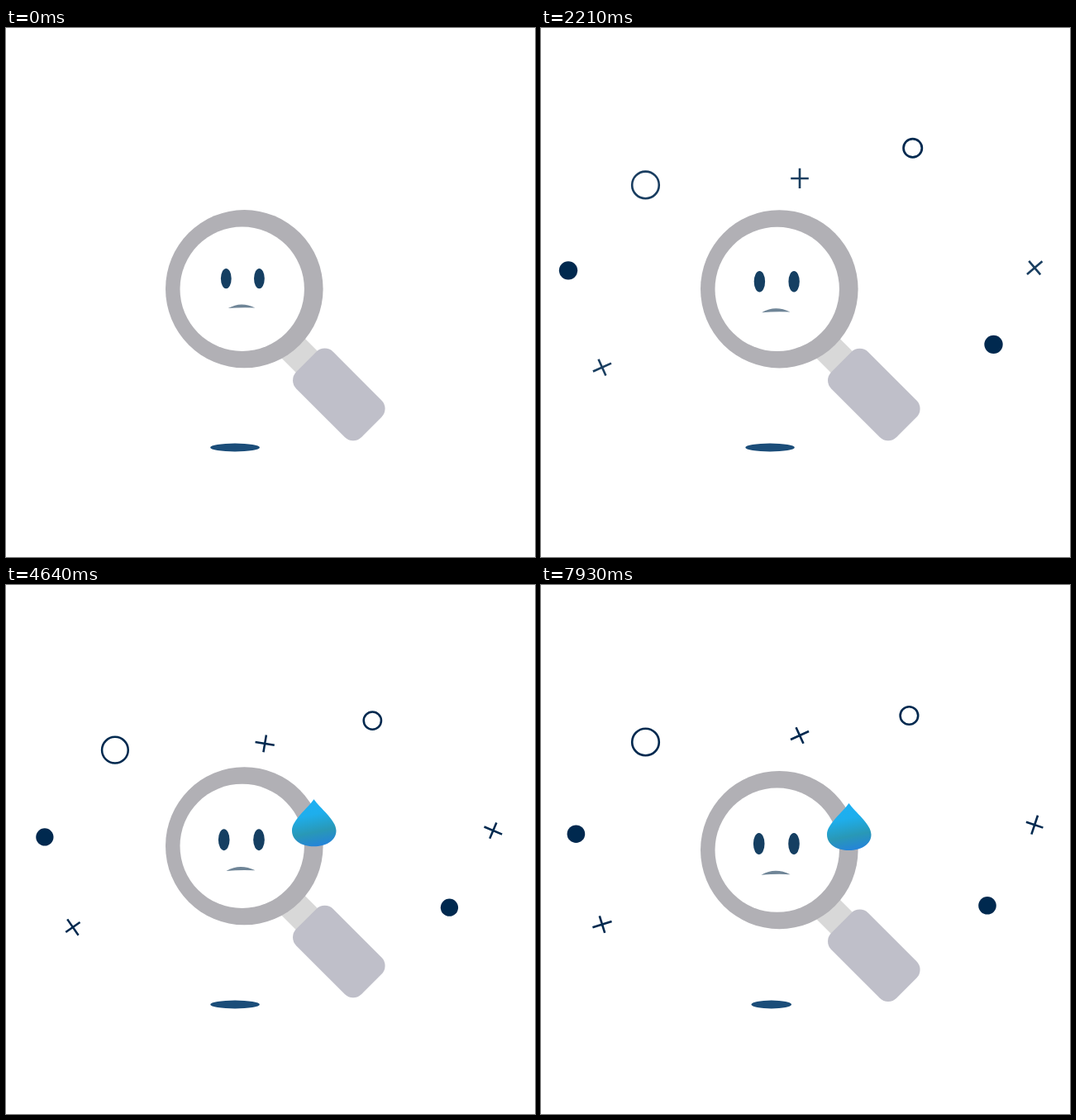
An HTML page with a canvas that plays this animation: 640x640 px, repeating every 8000 ms.

```html
<!DOCTYPE html>
<html>
<head>
<meta charset="utf-8">
<style>
  html, body { margin: 0; width: 100%; height: 100%; overflow: hidden; background: #fff; }
  canvas { display: block; width: 640px; height: 640px; }
</style>
</head>
<body>
<canvas id="stage" width="640" height="640"></canvas>
<script>
const ctx = document.getElementById('stage').getContext('2d');
const LOOP = 8000;
const NAVY = '#00294f';
const ORIGIN = { x: 318.5, y: 533 };

// Piecewise linear value from [time, value] keys.
function track(t, keys) {
  if (t <= keys[0][0]) return keys[0][1];
  for (let i = 1; i < keys.length; i++) {
    const [t0, v0] = keys[i - 1], [t1, v1] = keys[i];
    if (t < t1) return v0 + (v1 - v0) * (t - t0) / (t1 - t0);
  }
  return keys[keys.length - 1][1];
}

const early = {
  scale: [[0, 0], [280, 0], [1570, 1.11], [2865, 0.888], [5240, 1]],
  alpha: [[280, 0], [1500, 1], [1600, 1], [2865, 0.8], [3800, 1]]
};
const late = {
  scale: [[0, 0], [1570, 1.028], [1730, 1.106], [2865, 0.936], [5240, 1]],
  alpha: [[0, 0], [1720, 1]]
};

// Each cross turns at a steady rate (degrees per second) from its start time.
const symbols = [
  { x: 126.5, y: 190, ring: 16.3, group: early },
  { x: 313, y: 182, spin: 44.4, from: 2400, group: early },
  { x: 597.2, y: 290.2, spin: 26, from: 300, group: early },
  { x: 74, y: 410.6, spin: 32.7, from: 200, group: early },
  { x: 445.4, y: 158, ring: 10.8, group: late },
  { x: 42.4, y: 301.2, dot: 10.8, group: late },
  { x: 540, y: 387.8, dot: 10.8, group: late }
];

function ellipse(x, y, rx, ry, color) {
  ctx.fillStyle = color;
  ctx.beginPath();
  ctx.ellipse(x, y, rx, ry, 0, 0, 2 * Math.PI);
  ctx.fill();
}

function drawSymbol(symbol, t) {
  const scale = track(t, symbol.group.scale);
  if (scale <= 0) return;
  ctx.save();
  ctx.globalAlpha = track(t, symbol.group.alpha);
  ctx.translate(ORIGIN.x, ORIGIN.y);
  ctx.scale(scale, scale);
  ctx.translate(symbol.x - ORIGIN.x, symbol.y - ORIGIN.y);
  ctx.strokeStyle = NAVY;
  ctx.lineWidth = 2.6;
  if (symbol.dot) {
    ellipse(0, 0, symbol.dot, symbol.dot, NAVY);
  } else {
    ctx.beginPath();
    if (symbol.ring) {
      ctx.arc(0, 0, symbol.ring, 0, 2 * Math.PI);
    } else {
      ctx.rotate(symbol.spin * Math.max(0, t - symbol.from) / 1000 * Math.PI / 180);
      ctx.moveTo(-10.8, 0);
      ctx.lineTo(10.8, 0);
      ctx.moveTo(0, -12.1);
      ctx.lineTo(0, 12.1);
    }
    ctx.stroke();
  }
  ctx.restore();
}

function drawLens() {
  ctx.fillStyle = '#d8d8d8';
  ctx.fill(new Path2D('M361 375 L378 392 L352 418 L333 399 Z'));
  ctx.save();
  ctx.translate(402.8, 443.3);
  ctx.rotate(Math.PI / 4);
  ctx.fillStyle = '#bfbfc9';
  ctx.beginPath();
  ctx.roundRect(-55.8, -31.5, 111.6, 63, 14.4);
  ctx.fill();
  ctx.restore();
  ellipse(288.3, 315.6, 95.3, 95.6, '#b1b0b5');
  ellipse(285.7, 315.7, 75.2, 75.2, '#fff');
}

function drawFace(t) {
  const p = track(t, [[1700, 0], [2400, 1]]);
  const mix = (a, b) => a + (b - a) * p;
  const eyeY = mix(303, 308);
  for (const x of [mix(266.3, 263.7), mix(306.4, 306)]) {
    ellipse(x, eyeY, mix(6.4, 6.8), mix(12.1, 13), '#153f62');
  }
  ctx.save();
  ctx.translate(mix(285, 284), mix(338.7, 345.5));
  ctx.scale(mix(1, 1.08), mix(1, 1.08));
  ctx.fillStyle = '#6f8597';
  ctx.fill(new Path2D('M-16.3 0.3 Q-8 -4.4 0 -4.4 Q8 -4.4 16.3 -0.3 Q0 -1.2 -16.3 0.3 Z'));
  ctx.restore();
}

const sweat = new Path2D('M372.5 259 C380 270 399.5 284 399.5 297 ' +
  'C399.5 309 387 316 372.5 316 C358 316 346 309 346 297 C346 284 365 270 372.5 259 Z');
const sweatFill = ctx.createLinearGradient(367, 259, 379, 317);
[[0, '#1db0f4'], [0.32, '#1eaeec'], [0.68, '#2998b6'], [1, '#2482dc']]
  .forEach(([at, color]) => sweatFill.addColorStop(at, color));

function drawSweat(t) {
  const scale = track(t, [[2400, 0], [3080, 1]]);
  if (scale <= 0) return;
  ctx.save();
  ctx.globalAlpha = track(t, [[2400, 0], [3300, 1]]);
  ctx.translate(372.5, 239);
  ctx.scale(scale, scale);
  ctx.translate(-372.5, -239);
  ctx.fillStyle = sweatFill;
  ctx.fill(sweat);
  ctx.restore();
}

function draw(t) {
  const bob = 3.6 * (1 + Math.cos(2 * Math.PI * (t - 1127) / 2420));
  ctx.fillStyle = '#fff';
  ctx.fillRect(0, 0, 640, 640);
  ellipse(277 + 0.35 * bob, 507.5, 30 - 1.165 * bob, 5, '#1b4d79');
  symbols.forEach(symbol => drawSymbol(symbol, t));
  ctx.save();
  ctx.translate(0, bob);
  drawLens();
  drawFace(t);
  drawSweat(t);
  ctx.restore();
}

const start = performance.now();
function frame() {
  draw((performance.now() - start) % LOOP);
  requestAnimationFrame(frame);
}
frame();
</script>
</body>
</html>
```
